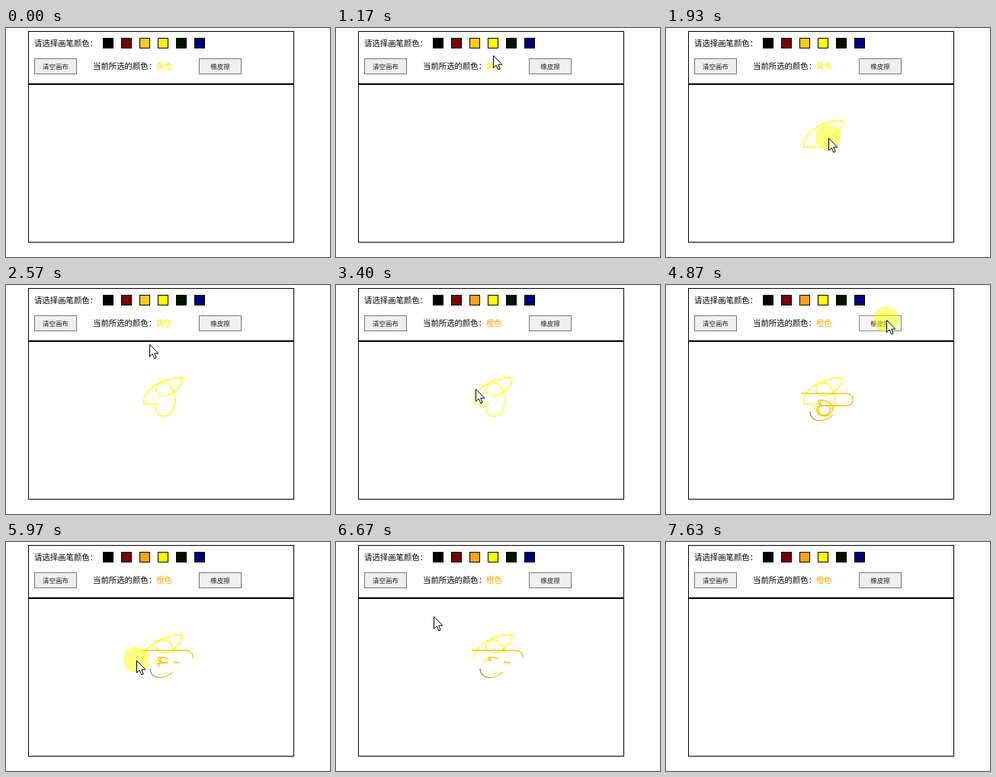
Animation of 425x302 px, one loop 8.56 s. Source, as an HTML page:

```html
<!DOCTYPE html>
<html lang="zh">
<head>
<meta charset="utf-8">
<title>画板</title>
<style>
  html, body { margin: 0; width: 100%; height: 100%; overflow: hidden; background: #fff; }
  svg { display: block; width: 425px; height: 302px; }
  text { font: 10.4px "Noto Sans CJK SC", "Noto Sans CJK", sans-serif; }
  #swatches rect { stroke: #000; }
  .button rect { fill: #efefef; stroke: #767676; }
  .button text { font-size: 8.5px; text-anchor: middle; fill: #222; }
  .button.hover rect { fill: #f5f5f5; stroke: #8a8a8a; }
  #ink path { fill: none; stroke: none; stroke-width: 1.4; stroke-linejoin: round; }
  #ink .yellow { stroke: #ffff1a; }
  #ink .orange { stroke: #ffc010; }
  #ink .smile { stroke: url(#fade); }
  #ink .erase { stroke: #fff; stroke-width: 8; }
</style>
</head>
<body>
<svg viewBox="0 0 425 302">
  <defs>
    <linearGradient id="fade" gradientUnits="userSpaceOnUse" x1="189" x2="208">
      <stop offset="0" stop-color="#a87850"/>
      <stop offset="1" stop-color="#f8cc30"/>
    </linearGradient>
  </defs>
  <rect x="29.5" y="4.5" width="348" height="278" fill="#fff" stroke="#000"/>
  <g id="ink"></g>
  <rect x="29" y="73" width="349" height="2"/>
  <text x="37" y="23.5">请选择画笔颜色：</text>
  <g id="swatches"></g>
  <g class="button">
    <rect x="37.5" y="40.5" width="55" height="20"/>
    <text x="65" y="54.3">清空画布</text>
  </g>
  <text x="114" y="54.2">当前所选的颜色：</text>
  <text id="chosen" x="197" y="54.2"></text>
  <g class="button">
    <rect x="253.5" y="40.5" width="55" height="20"/>
    <text x="281" y="54.3">橡皮擦</text>
  </g>
  <g id="pointer">
    <circle id="press" cx="-.4" cy="-.7" r="17" fill="#ff0" fill-opacity=".5"/>
    <path d="M.5 .5V16.5L4.2 13L6.8 19L9.2 18L6.7 12.2H11.8Z" fill="#fff" stroke="#000"/>
  </g>
</svg>
<script>
const LOOP = 8560, ENTER = 130, CLEAR = 7210, LEAVE = 7630;
const PICK_YELLOW = 890, PICK_ORANGE = 2710, HOLD = 200;
const clicks = [PICK_YELLOW, PICK_ORANGE, 4800, 7140];
const $ = id => document.getElementById(id);

function add(parent, tag, attrs) {
  const el = document.createElementNS("http://www.w3.org/2000/svg", tag);
  for (const name in attrs) el.setAttribute(name, attrs[name]);
  return parent.appendChild(el);
}

const swatches = ["#000", "#7c0000", "", "", "#001200", "#000078"].map((fill, i) =>
  add($("swatches"), "rect", { x: 127.5 + 24 * i, y: 13.5, width: 13, height: 13, fill }));

// Pointer travel: start, end, path from where the last leg stopped, ink laid down.
let spot = { x: 339, y: 273 };
const legs = [
  [ENTER, 690, "L201 29"],
  [820, PICK_YELLOW, "L207 18"],
  [1090, 1450, "L201 157"],
  [1480, 1930, "H181C178 140 200 124 229 122C236 123 226 140 213 145", "yellow"],
  [1930, 2350, "C204 149 196 142 197 136C199 126 215 126 220 142C226 160 216 174 205 173Q197 172 196 159", "yellow"],
  [2400, PICK_ORANGE, "L183 18"],
  [2910, 3400, "L183 137"],
  [3400, 3520, "L178 143"],
  [3520, 4030, "H236C248 143 248 159 238 159H206Q196 154 201 152Q218 152 218 162A10 9 0 1 1 199 160L214 159A8 8 0 0 1 200 168L203 152", "orange"],
  [4030, 4130, "L219 171"],
  [4130, 4400, "C212 180 190 184 189 167", "smile"],
  [4400, 4800, "L289 46"],
  [5000, 5210, "L258 157"],
  [5210, 5970, "H241H262L233 157L217 149L216 168L198 170L188 157L171 156", "erase"],
  [5970, 6250, "Q190 168 216 157", "erase"],
  [6300, 7000, "L54 48"],
  [7490, 7560, "L132 97"]
].map(([from, to, route, ink = ""]) => {
  const path = add($("ink"), "path", { d: `M${spot.x} ${spot.y}${route}`, class: ink });
  const length = path.getTotalLength();
  path.style.strokeDasharray = `${length} ${length + 9}`;
  spot = path.getPointAtLength(length);
  return { from, to, path, ink, length };
});

const buttons = [...document.querySelectorAll(".button")].map(el => ({ el, box: el.firstElementChild.getBBox() }));
const inside = (p, b) => p.x > b.x && p.x < b.x + b.width && p.y > b.y && p.y < b.y + b.height;
const within = (t, from, to) => t >= from && t < to;
const ease = p => p * p * (3 - 2 * p);
const show = (el, on) => { el.style.visibility = on ? "visible" : "hidden"; };

function draw(t) {
  let at = { x: 339, y: 273 };
  for (const { from, to, path, ink, length } of legs) {
    const p = Math.max(0, Math.min(1, (t - from) / (to - from)));
    if (t >= from) at = path.getPointAtLength(length * (ink ? p : ease(p)));
    path.style.strokeDashoffset = length * (1 - p);
    show(path, p > 0 && t < CLEAR);
  }
  const present = within(t, ENTER, LEAVE);
  const pressed = clicks.some(c => within(t, c, c + HOLD)) || legs.some(l => l.ink && within(t, l.from, l.to));
  $("pointer").setAttribute("transform", `translate(${Math.round(at.x)} ${Math.round(at.y)})`);
  $("pointer").style.display = present ? "" : "none";
  show($("press"), pressed);
  for (const { el, box } of buttons) el.classList.toggle("hover", present && inside(at, box));

  const yellow = t >= PICK_YELLOW, orange = t >= PICK_ORANGE;
  $("chosen").textContent = orange ? "橙色" : "黄色";
  $("chosen").setAttribute("fill", orange ? "#ffa500" : "#ffec08");
  swatches[2].setAttribute("fill", orange ? "#f9a215" : "#ffcb18");
  swatches[3].setAttribute("fill", yellow ? "#ff0" : "#ffe822");
}

function frame() {
  draw(performance.now() % LOOP);
  requestAnimationFrame(frame);
}
frame();
</script>
</body>
</html>
```
